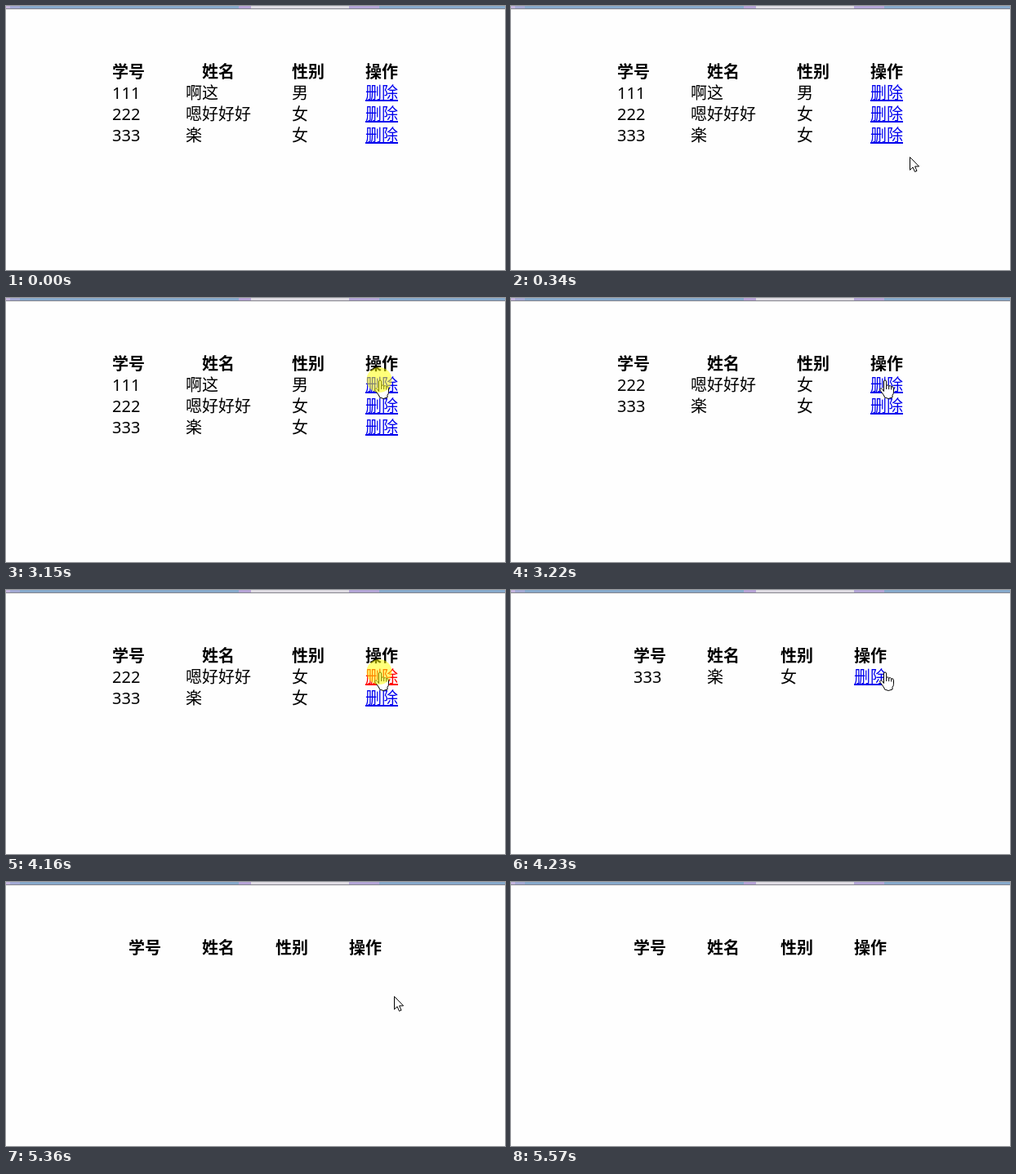
An HTML page that plays this animation: 611x324 px, repeating every 6170 ms.

```html
<!DOCTYPE html>
<html lang="zh-CN">
<head>
<meta charset="utf-8">
<title>学号</title>
<style>
  html, body { margin: 0; width: 100%; height: 100%; overflow: hidden; background: #fefefe; }
  svg { display: block; }
  text { font: 350 20px "Noto Sans CJK SC DemiLight", "Noto Sans CJK SC", "Noto Sans CJK", sans-serif; white-space: pre; }
  .number { font: 400 20px "Noto Sans", sans-serif; }
  .head text { font: 700 20px "Noto Sans CJK SC", "Noto Sans CJK", sans-serif; }
</style>
</head>
<body>
<svg width="611" height="324" viewBox="0 0 611 324">
  <rect width="611" height="324" fill="#fefefe"/>
  <g id="strip"></g>
  <g id="table"></g>
  <g id="arrow">
    <path d="M.5 .5V16.3L4.1 12.9L6.5 18.4L9 17.3L6.6 11.9H11.6Z" fill="#fff" stroke="#000"/>
  </g>
  <g id="hand" fill="#fff" stroke="#000" stroke-linejoin="round">
    <path d="M-.5 14.5V2A1.7 1.7 0 0 1 2.6 2V7.5Q4.4 6 5.7 8Q7.6 6.8 8.7 8.9Q11.2 8 11.5 10.7V15.5Q11.5 17.5 10 19.5V22Q5 25 .5 22Q.2 20 -1.5 18L-5 13.3Q-6 11.5 -4.6 11Q-3.5 10.6 -2.2 12.1Z"/>
    <path d="M2.6 7.5V12M5.7 8V12.2M8.7 8.9V12.5" fill="none"/>
  </g>
  <circle id="click" cx="457" cy="100.5" r="15.5" fill="#ffff00" fill-opacity=".52"/>
</svg>
<script>
const LOOP = 6170, STEP = 70;
const TARGET = { x: 457, y: 100 };
const ROWS = [["111", "啊这", "男"], ["222", "嗯好好好", "女"], ["333", "楽", "女"]];
const HEADS = ["学号", "姓名", "性别", "操作"];
const WIDE = { head: [130, 240, 350, 440], body: [130, 220, 350, 440] };
const NARROW = { head: [150, 240, 330, 420], body: [150, 240, 330, 420] };

const el = id => document.getElementById(id);
const label = (x, y, s, fill = "#000", kind = "") =>
  `<text x="${x}" y="${y}" fill="${fill}" class="${kind}">${s}</text>`;
const band = (x, w, fill, y = 0, h = 3) =>
  `<rect x="${x}" y="${y}" width="${w}" height="${h}" fill="${fill}"/>`;

el("strip").innerHTML =
  band(0, 611, "#86a9cb") + band(0, 5, "#c3b4dc") + band(5, 12, "#a3a9d3") +
  band(285, 17, "#b6a4d6") + band(300, 120, "#dedbe2") + band(420, 37, "#b3a5d6") +
  band(0, 611, "#85858d", 3, 1);

function tableMarkup(first, active) {
  const cols = first < 2 ? WIDE : NARROW;
  let out = `<g class="head">${HEADS.map((s, i) => label(cols.head[i], 88, s)).join("")}</g>`;
  ROWS.slice(first).forEach((row, r) => {
    const y = 114 + 26 * r, x = cols.body[3];
    const color = active && r === 0 ? "#ff0000" : "#0000ee";
    out += row.map((s, i) => label(cols.body[i], y, s, "#000", i ? "" : "number")).join("");
    out += label(x, y, "删除", color) + band(x, 40, color, y + 1, 2);
  });
  return out;
}

function pointer(t) {
  if (t < 70 || t >= 5570) return null;
  if (t < 620) {
    const left = 1 - Math.floor((t - 70) / (550 / 8)) / 8;
    return { x: TARGET.x + 49 * left, y: TARGET.y + 172 * left ** 1.5 };
  }
  if (t < 5360) return TARGET;
  const p = (Math.floor((t - 5360) / STEP) + 1) / 3;
  return { x: TARGET.x + 54 * p, y: TARGET.y + 208 * p ** 1.5 };
}

function place(node, pos, visible) {
  node.setAttribute("visibility", visible ? "visible" : "hidden");
  if (visible) node.setAttribute("transform", `translate(${Math.round(pos.x)} ${Math.round(pos.y)})`);
}

let shown = "";
function draw(t) {
  const first = [3220, 4230, 5160].filter(time => t >= time).length;
  const clicked = [3150, 4160, 5090].some(time => t >= time && t < time + STEP);
  const active = clicked && t >= 4160;
  const key = first + "|" + active;
  if (key !== shown) {
    el("table").innerHTML = tableMarkup(first, active);
    shown = key;
  }
  const pos = pointer(t);
  const overLink = pos && pos.x >= 440 && pos.x < 480 &&
    pos.y >= 96 && pos.y < 96 + 26 * (3 - first);
  place(el("hand"), pos, overLink);
  place(el("arrow"), pos, pos && !overLink);
  el("click").setAttribute("visibility", clicked ? "visible" : "hidden");
}

const start = performance.now();
function tick() {
  draw((performance.now() - start) % LOOP);
  requestAnimationFrame(tick);
}
tick();
</script>
</body>
</html>
```
